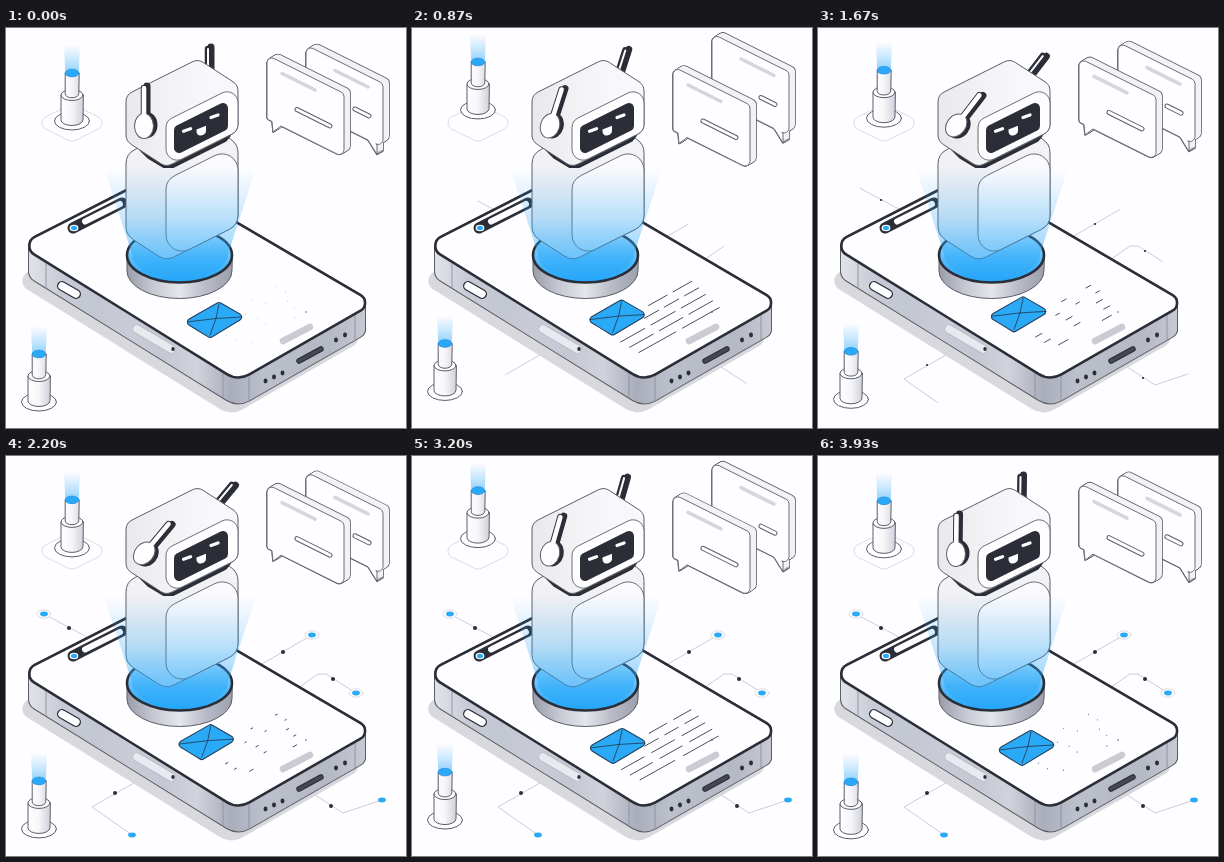
Write an HTML page with a canvas that moves like this. It is 400x400 px and loops after 4 s.

```html
<!DOCTYPE html>
<html lang="en">
<head>
<meta charset="utf-8">
<title>Assistant on a phone</title>
<style>
html, body { margin: 0; width: 100%; height: 100%; overflow: hidden; background: #fefdff; }
canvas { display: block; width: 400px; height: 400px; }
</style>
</head>
<body>
<canvas id="stage"></canvas>
<script>
const canvas = document.getElementById('stage');
const g = canvas.getContext('2d');
const ratio = window.devicePixelRatio || 1;
canvas.width = canvas.height = 400 * ratio;

const LOOP = 4000, PAPER = '#fefdff', DARK = '#2b2e37', INK = '#5b5e67', BLUE = '#2aa9f6', PALE = '#d6d7dc';
const clamp = v => Math.max(0, Math.min(1, v));
const wave = (t, period) => (1 - Math.cos(2 * Math.PI * t / period)) / 2;

function paint(path, fill, stroke, width = 1) {
  if (fill) { g.fillStyle = fill; g.fill(path); }
  if (stroke) { g.strokeStyle = stroke; g.lineWidth = width; g.stroke(path); }
}

function oval(x, y, rx, ry, fill, stroke, width) {
  const p = new Path2D();
  p.ellipse(x, y, rx, ry, 0, 0, 2 * Math.PI);
  paint(p, fill, stroke, width);
}

function open(pts) {
  const p = new Path2D();
  for (const [x, y] of pts) p.lineTo(x, y);
  return p;
}

const line = (x1, y1, x2, y2, color, width = 1) => paint(open([[x1, y1], [x2, y2]]), null, color, width);

// Rounded bar with an outline
function pill(x1, y1, x2, y2, width, fill, edge, border = 1) {
  line(x1, y1, x2, y2, edge, width);
  line(x1, y1, x2, y2, fill, width - 2 * border);
}

// Evenly spaced colours along a line
function fade(x1, y1, x2, y2, ...colors) {
  const grad = g.createLinearGradient(x1, y1, x2, y2);
  colors.forEach((c, i) => grad.addColorStop(i / (colors.length - 1), c));
  return grad;
}

function roundPoly(pts, radius) {
  const p = new Path2D(), n = pts.length, last = pts[n - 1];
  const r = i => Array.isArray(radius) ? radius[i] : radius;
  p.moveTo((last[0] + pts[0][0]) / 2, (last[1] + pts[0][1]) / 2);
  pts.forEach((a, i) => p.arcTo(...a, ...pts[(i + 1) % n], r(i)));
  p.closePath();
  return p;
}

// Upright parallelogram whose top edge runs along the slope
const panel = (x, y, w, h, slope) => [[x, y], [x + w, y + w * slope], [x + w, y + w * slope + h], [x, y + h]];

function shifted(dx, dy, draw) {
  g.save();
  g.translate(dx, dy);
  draw();
  g.restore();
}

function extrude(path, dx, dy, fill, width) {
  const n = Math.ceil(Math.hypot(dx, dy));
  for (const pass of [[null, INK, width], [fill]])
    for (let k = n; k >= 0; k--) shifted(dx * k / n, dy * k / n, () => paint(path, ...pass));
}

function tube(x, y, rx, ry, h, side, top, edge, width) {
  const p = new Path2D();
  p.ellipse(x, y + h, rx, ry, 0, 0, Math.PI);
  p.lineTo(x - rx, y);
  p.lineTo(x + rx, y);
  p.closePath();
  paint(p, side, INK);
  oval(x, y, rx, ry, top, edge, width);
}

// Light cone widening upwards
function glow(x, y, rx, ry, spread, h, alpha) {
  const p = new Path2D(), tint = a => `rgba(41,168,250,${a})`;
  p.ellipse(x, y, rx, ry, 0, 0, Math.PI);
  p.lineTo(x - spread, y - h);
  p.lineTo(x + spread, y - h);
  p.closePath();
  paint(p, fade(0, y + ry, 0, y - h, tint(alpha), tint(alpha * 0.45), tint(0)));
}

// Lens at the origin
function emitter() {
  const metal = fade(-11, 0, 11, 0, '#fff', '#f6f5f9', '#d0d3db');
  oval(0, 48, 17.5, 9, PAPER, INK);
  tube(0, 22, 11, 5.5, 25, metal, PAPER, INK);
  tube(0, 0, 6.8, 3.8, 21, metal, BLUE, '#2682cc', 0.8);
  glow(0, 0, 6.8, 3.8, 8, 28, 0.6);
}

function bubble(x, y, bar, pin, tail, tip) {
  const w = 77, h = 64, slope = 0.5;
  const at = (px, off) => [px, y + (px - x) * slope + off];
  const [tl, tr, br, bl] = panel(x, y, w, h, slope);
  const p = roundPoly([tl, tr, br, at(tail + 9, h), at(tip, h + 10), at(tail, h), bl], [5, 5, 5, 0, 0, 0, 3]);
  extrude(p, 6, -3.6, '#f3f2f6', 1.6);
  paint(p, PAPER, INK, 0.9);
  line(...at(x + bar, 11), ...at(x + bar + 33, 11), PALE, 3.5);
  pill(...at(x + pin, 39.5), ...at(x + 63, 39.5), 5, PAPER, INK);
}

// Each: ring radius, dot, then the route
const links = [
  [7, [63, 172], [[92, 187], [38, 158]]],
  [7, [277, 196], [[249, 212], [306, 179]]],
  [7, [327, 223], [[279, 241], [312, 218], [320, 218], [350, 237]]],
  [0, [109, 337], [[140, 320], [86, 351], [126, 379]]],
  [0, [325, 350], [[300, 333], [337, 357], [376, 344]]]
];

function connectors(t) {
  const grow = clamp(t / 1800), mid = clamp((t - 1500) / 300), end = clamp((t - 1700) / 300);
  for (const [ring, dot, pts] of links) {
    const total = pts.slice(1).reduce((sum, [x, y], i) => sum + Math.hypot(x - pts[i][0], y - pts[i][1]), 0);
    const [x, y] = pts[pts.length - 1];
    g.lineCap = 'butt';
    g.setLineDash([total * grow, 999]);
    if (grow) paint(open(pts), null, '#cdced3', 1);
    g.setLineDash([]);
    g.lineCap = 'round';
    if (end && ring) oval(x, y, ring * end, ring * 0.6 * end, PAPER, '#d2d4da', 0.8);
    if (end) oval(x, y, 3.9 * end, 2.4 * end, BLUE);
    if (mid) oval(...dot, 2 * mid, 1.9 * mid, DARK);
  }
}

const face = roundPoly([[13, 217], [150, 147], [368, 275], [232, 353]], [10, 20, 9, 22]);

function phone() {
  shifted(-7, 35, () => paint(face, '#d9d9dd'));
  extrude(face, 0, 26, fade(24, 0, 358, 0, '#dfe2e8', '#c6cad4', '#c3c7d2', '#c9ccd6', '#c4c8d2',
    '#d0d3db', '#aaaebb', '#bcc0cb', '#b8bcc7', '#b5b9c4', '#c6c9d2'), 2);
  for (const [x, y] of [[40, 234], [217, 343], [243, 346], [349, 286]]) line(x, y, x, y + 26, '#8d919d', 0.9);
  paint(face, PAPER, DARK, 2.6);

  pill(56, 258, 70, 266, 10, PAPER, DARK, 1.3);
  pill(131, 301, 165, 321, 9, '#e8eaef', '#b6b9c4', 0.7);
  oval(167, 321, 1.7, 1.9, DARK);
  for (let k = 0; k < 3; k++) oval(259.5 + 8.5 * k, 353 - 4 * k, 2, 2.4, DARK);
  for (let k = 0; k < 2; k++) oval(330 + 9 * k, 312 - 5 * k, 2, 2.4, DARK);
  pill(293, 333, 315, 321, 5.5, '#454852', DARK);

  line(67, 200, 116, 175, DARK, 11);
  line(79, 193.5, 114, 176, PAPER, 6);
  oval(68, 200, 4.4, 3.2, PAPER);
  oval(68, 200, 3, 2.2, BLUE);
  line(277, 313, 304, 299, '#cbccd3', 6.5);
}

// Dashes open and close around their centres
function writing(s) {
  const slope = -0.56;
  for (let row = 0; row < 5; row++) {
    const from = row < 2 ? 236 - 4 * row : 190 + 9 * row, to = 280 + 7 * row;
    const parts = row === 4 ? 2 : 3 - (row === 0), step = (to - from + 5) / parts;
    for (let k = 0; k < parts; k++) {
      const cx = from + step * (k + 0.5) - 2.5, cy = 410 + 10.4 * row + slope * cx;
      const half = (step - 5) / 2 * s;
      line(cx - half, cy - half * slope, cx + half, cy + half * slope, '#4c4f58', s < 0.01 ? 0.4 : 1);
    }
  }
  oval(300, 284, 0.7, 0.7, DARK);
}

function envelope(e) {
  const [l, t, r, b] = [[178, 294], [213, 274], [239, 289], [204, 310]];
  const edge = '#24415f', fold = [210, 290.5];
  shifted(-8.5 * e, -6 * e, () => {
    paint(roundPoly([l, t, r, b], 3.5), BLUE, edge, 1.1);
    paint(open([[181, 294], fold, [213, 276]]), null, edge, 0.9);
    for (const end of [[204, 307], [236, 289]]) line(...fold, ...end, edge, 0.9);
  });
}

function disc() {
  tube(173.5, 227, 52.5, 27.5, 16, fade(121, 0, 226, 0, '#999da9', '#c6c9d2', '#e4e6eb', '#b9bcc7', '#9ca0ac'),
    fade(0, 205, 0, 254, '#b5e2fd', '#5cbffb', '#20a4f8'), DARK, 2.6);
}

// Box seen from its right front: panel plus a side running back to the left
function box(x, y, w, h, radius, side, front) {
  const [tl, tr, br, bl] = panel(x, y, w, h, -0.5), back = ([px, py]) => [px - 40, py - 26];
  paint(roundPoly([bl, br, tr, back(tr), back(tl), back(bl)], radius), side, INK, 1);
  paint(roundPoly([tl, tr, br, bl], radius), front, INK, 0.9);
}

function ear(x, y, len, angle, bulb) {
  g.save();
  g.translate(x, y);
  g.rotate(angle);
  line(2, -2, 2, -len + 3, DARK, 7);
  if (bulb) oval(2, -1, 10.5, 13, DARK);
  line(-1, 0, -1, -len + 5, DARK, 6.5);
  if (bulb) oval(-1, 0, 9.5, 12.5, PAPER, INK, 1);
  line(-1, -3, -1, -len + 5, PAPER, bulb ? 4.6 : 2);
  g.restore();
}

function robot(t) {
  const angle = 0.37 * (wave(t, 4000) + 1 - Math.abs(t / 2000 - 1));

  box(160, 152, 72, 81, 16,
    fade(0, 120, 0, 224, '#f3f3f6', '#eeeff3', '#e4ecf3', '#b4defa'),
    fade(0, 120, 0, 224, '#fcfbfd', '#f8f8fb', '#eaf3fa', '#bfe3fb'));
  glow(174, 226, 48, 25, 76, 86, 0.62);

  paint(open([[135, 121], [143, 129], [158, 138], [167, 138], [219, 112], [223, 107]]), null, DARK, 4);
  ear(203, 58, 42, angle, false);
  box(160, 93, 72, 46, 11, fade(120, 0, 200, 0, '#e8e8ed', '#f2f2f5', '#f8f8fa'), PAPER);
  paint(roundPoly(panel(168, 99, 54, 29, -0.5), 5), DARK);
  for (const x of [177.5, 205]) line(x, 192 - x / 2, x + 7, 189.5 - x / 2, PAPER, 3.2);
  paint(roundPoly(panel(190.5, 101.5, 9.5, 8, -0.4), [0, 0, 4, 4]), PAPER);
  ear(139, 98, 43, angle, true);
}

function draw(t) {
  g.setTransform(ratio, 0, 0, ratio, 0, 0);
  g.fillStyle = PAPER;
  g.fillRect(0, 0, 400, 400);
  g.lineCap = g.lineJoin = 'round';

  const p = wave(t, 2000);
  paint(roundPoly([[27, 95], [66, 76], [105, 95], [66, 114]], 7), null, '#d9dade', 0.9);
  shifted(66, 45 - 11.5 * p, emitter);
  shifted(33, 326 - 11 * p, emitter);
  bubble(300, 17 - 12 * p, 29, 49, 362, 371);
  bubble(261, 27 + 12 * p, 15, 30, 266, 267);
  connectors(t);
  phone();
  writing(p);
  envelope(wave(t, 4000));
  disc();
  robot(t);
}

function tick() {
  draw(performance.now() % LOOP);
  requestAnimationFrame(tick);
}
tick();
</script>
</body>
</html>
```
